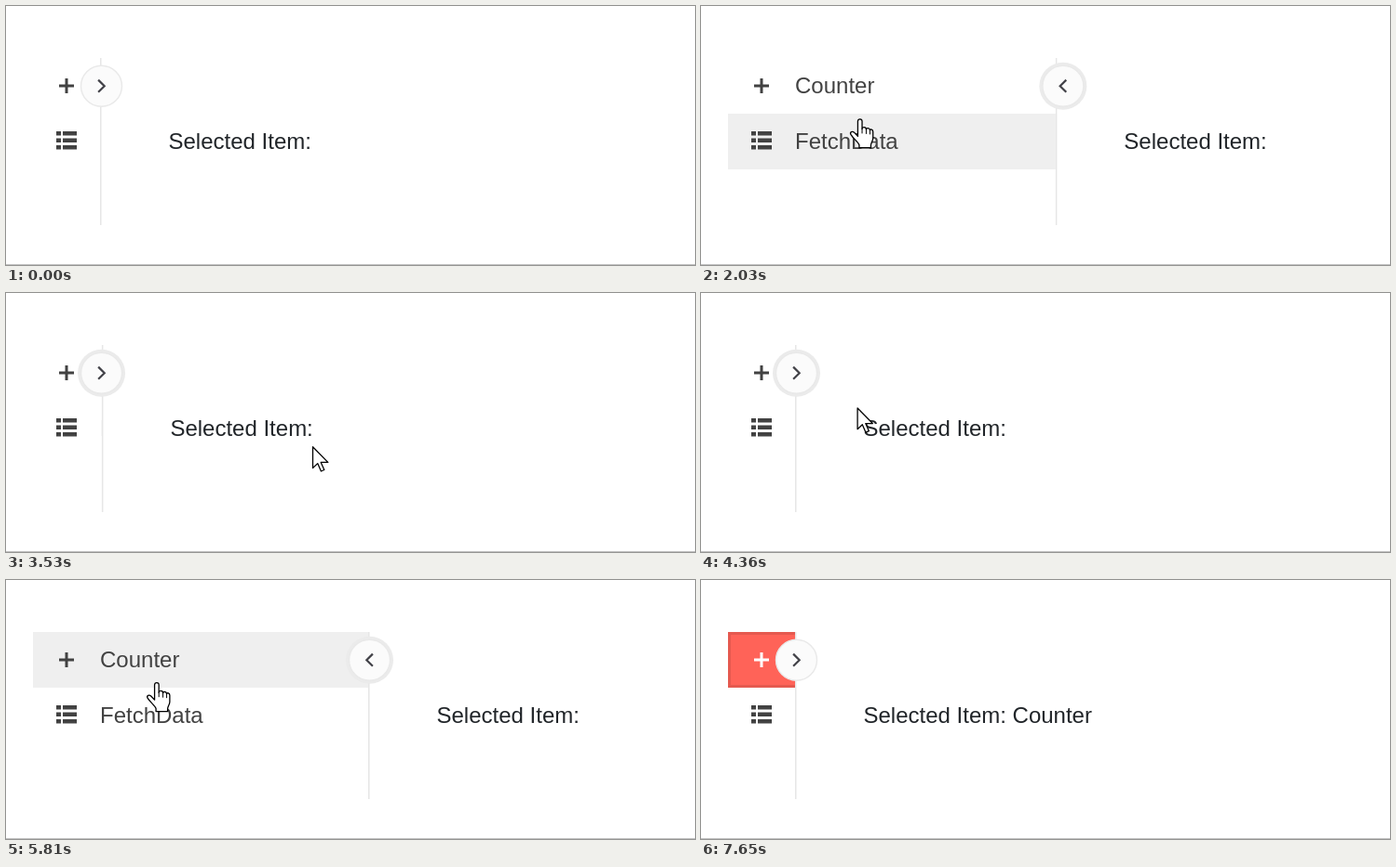
Write an HTML page that moves like this. It is 740x279 px and loops after 8.25 s.

```html
<!DOCTYPE html>
<html lang="en">
<head>
<meta charset="utf-8">
<title>Collapsible drawer</title>
<style>
  html, body { margin: 0; width: 100%; height: 100%; overflow: hidden; background: #fff; }
  svg { display: block; width: 740px; height: 279px; }
  text { font: 24px "Liberation Sans", Arial, sans-serif; white-space: pre; }
</style>
</head>
<body>
<svg viewBox="0 0 740 279">
  <defs>
    <clipPath id="clip"><rect id="clipBox" x="29" y="56" width="72" height="180"/></clipPath>
  </defs>
  <rect y="278" width="740" height="1" fill="#c3c3c3"/>

  <g clip-path="url(#clip)">
    <rect id="row0" x="29" y="56" width="360" height="60"/>
    <rect id="edge" x="30.5" y="57.5" width="357" height="57" fill="none" stroke-width="3"/>
    <rect id="row1" x="29" y="116" width="360" height="60"/>
    <g id="item0">
      <path d="M57 84.5h6.5V78h3v6.5H73v3h-6.5V94h-3v-6.5H57z"/>
      <text x="101" y="94">Counter</text>
    </g>
    <g fill="#424242">
      <path d="M54 135h5v4.5h-5zM61 135h15v4.5h-15zM54 142.5h5v4.5h-5zM61 142.5h15v4.5h-15zM54 150h5v4.5h-5zM61 150h15v4.5h-15z"/>
      <text x="101" y="154">FetchData</text>
    </g>
  </g>

  <rect id="line" y="56" width="1.5" height="180" fill="#e6e6e6"/>
  <text id="label" y="154" fill="#212529">Selected Item:</text>

  <g id="button">
    <circle id="ring" r="25.5" fill="#ebebeb"/>
    <circle id="disc" r="22" stroke-width="1.4"/>
    <path id="chevron" d="M-3.4 -6.6L3.2 0L-3.4 6.6" fill="none" stroke="#424248" stroke-width="2.2"/>
  </g>

  <g fill="#fff" stroke="#000" stroke-width="1.3" stroke-linejoin="round">
    <path id="arrow" d="M.5 .8V23.5L5.7 18.6L9.4 27L12.8 25.5L9.2 17.4H16.8z"/>
    <g id="hand">
      <path d="M-2.5 19V2.8a2.3 2.3 0 0 1 4.6 0V11c0-2.4 4.4-2.4 4.4.6c.4-2 4-1.6 4 .9c.5-1.6 3.3-1 3.3 1.6V21c0 3-2.3 5-2.3 7.6V31.4H-1V28.4c-1-3.4-6-6.4-9-11.4c-1.4-2.6 1.6-4 3.6-2.2z"/>
      <path d="M2.1 10.5V16M6.5 11.5V16.5M10.5 12.5V17" fill="none" stroke-width="1"/>
    </g>
  </g>
</svg>
<script>
const LOOP = 8250, STEP = 70;
const CLOSED = 101, TRAVEL = 288;
const FOCUS_ON = 1750, SELECT = 6550, ENTER = 790, LEAVE = 7650;

// Spans in which the picture is refreshed every STEP ms; it rests in between.
const spans = [
  [0, 0], [790, 1550], [1620, 1620], [1750, 2300], [2500, 3320], [3390, 3810],
  [4010, 4640], [4910, 5340], [5600, 5950], [6150, 6150], [6550, 6970], [7370, 7650]
];

// start, opens, delay of the panel behind the button
const toggles = [
  [1760, 1, 50], [3235, 0, 45], [4950, 1, 52], [6604, 0, 10]
];

const curves = {
  lin: u => u,
  in: u => u * u,
  out: u => u * (2 - u),
  both: u => u * u * (3 - 2 * u)
};

// time, x, y, curve towards this point
const path = [
  [790, 394, 262, 'lin'], [1500, 115, 83, 'both'], [1890, 115, 83, 'lin'],
  [2300, 322, 225, 'both'], [2430, 322, 225, 'lin'],
  [2780, 390, 112, 'in'], [2990, 391, 88, 'out'], [3310, 391, 88, 'lin'],
  [3530, 329, 165, 'lin'], [3810, 290, 212, 'out'], [3940, 290, 212, 'lin'],
  [4600, 115, 85, 'both'], [4880, 115, 85, 'lin'],
  [5050, 154, 124, 'lin'], [5340, 188, 162, 'out'], [5530, 188, 162, 'lin'],
  [5950, 153, 92, 'both'], [6100, 153, 92, 'lin'], [6150, 155, 90, 'lin'],
  [6970, 154, 90, 'lin'], [7300, 154, 90, 'lin'], [7580, 449, 255, 'in']
];

const $ = id => document.getElementById(id);
const set = (id, attrs) => {
  for (const k in attrs) $(id).setAttribute(k, attrs[k]);
};
const show = (id, on) => set(id, { visibility: on ? 'visible' : 'hidden' });

// cubic-bezier(.25, .1, .25, 1)
function ease(u) {
  if (u <= 0) return 0;
  if (u >= 1) return 1;
  let lo = 0, hi = 1, s = .5;
  const bez = (a, b) => 3 * (1 - s) * (1 - s) * s * a + 3 * (1 - s) * s * s * b + s * s * s;
  for (let i = 0; i < 20; i++) {
    if (bez(.25, .25) < u) lo = s; else hi = s;
    s = (lo + hi) / 2;
  }
  return bez(.1, 1);
}

function snap(t) {
  const [start, end] = spans.filter(s => s[0] <= t).pop();
  return t >= end ? end : start + Math.floor((t - start) / STEP) * STEP;
}

function slide(t, lagged) {
  let p = 0;
  for (const [start, opens, lag] of toggles) {
    const u = lagged ? (t - start - lag) / 280 : (t - start) / 300;
    if (u > 0) p = opens ? ease(u) : 1 - ease(u);
  }
  return CLOSED + TRAVEL * p;
}

function pointer(t) {
  const i = path.findIndex(k => k[0] > t);
  if (i === 0) return path[0].slice(1, 3);
  if (i < 0) return path[path.length - 1].slice(1, 3);
  const [t0, x0, y0] = path[i - 1], [t1, x1, y1, curve] = path[i];
  const f = curves[curve]((t - t0) / (t1 - t0));
  return [x0 + (x1 - x0) * f, y0 + (y1 - y0) * f];
}

const visible = t => t >= ENTER && t < LEAVE;

function overButton(t) {
  const [x, y] = pointer(t);
  return visible(t) && Math.hypot(x - slide(t) - 1.5, y - 86) < 23;
}

function draw(now) {
  const t = snap(now);
  const panel = slide(t, true), knob = slide(t);
  const [x, y] = pointer(t);
  const onKnob = overButton(t);
  const inPanel = visible(t) && !onKnob && x >= 29 && x < panel && y >= 56 && y < 176;
  const hot = inPanel ? (y < 116 ? 0 : 1) : -1;
  const selected = t >= SELECT;
  const last = toggles.filter(k => k[0] <= t).pop();
  const open = last && last[1];

  set('clipBox', { width: panel - 29 });
  set('line', { x: panel });
  set('label', { x: panel + 73.5 });
  $('label').textContent = 'Selected Item:' + (selected ? ' Counter' : '');

  const red = hot === 0 ? '#f65f54' : '#ff6358';
  set('row0', { fill: selected ? red : hot === 0 ? '#efefef' : 'none' });
  set('edge', { stroke: selected ? (hot === 0 ? '#d9534a' : '#e5594f') : 'none' });
  set('item0', { fill: selected ? '#fff' : '#424242' });
  set('row1', { fill: hot === 1 ? '#efefef' : 'none' });

  const grey = onKnob || overButton(t - 110);
  const focused = t >= FOCUS_ON && !selected;
  set('button', { transform: `translate(${knob + 1.5} 86.2)` });
  show('ring', focused);
  set('disc', {
    fill: grey ? (onKnob ? '#ebebeb' : '#efefef') : '#fbfbfb',
    stroke: grey ? (onKnob ? '#d2d2d2' : '#dedede') : '#e9e9e9'
  });
  set('chevron', { transform: open ? 'scale(-1 1)' : '' });

  const place = { transform: `translate(${x} ${y})` };
  const pointing = onKnob || inPanel;
  set('hand', place);
  set('arrow', place);
  show('hand', visible(t) && pointing);
  show('arrow', visible(t) && !pointing);
}

const begin = performance.now();
function tick() {
  draw((performance.now() - begin) % LOOP);
  requestAnimationFrame(tick);
}
tick();
</script>
</body>
</html>
```
